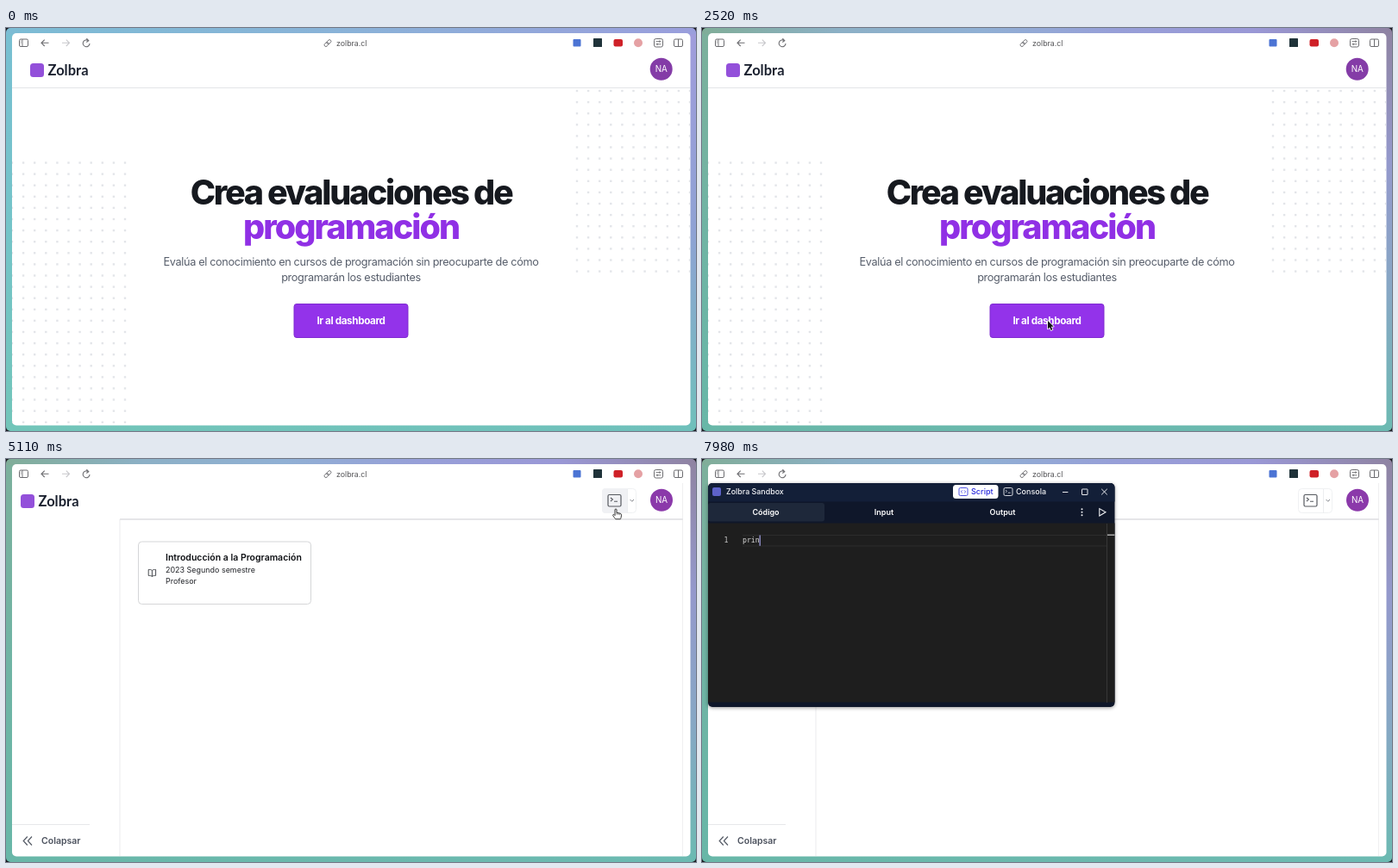
These frames come from a looping animation (800x468 px, 8000 ms). An HTML page with a canvas:

```html
<!DOCTYPE html>
<html lang="es">
<head>
<meta charset="utf-8">
<title>Zolbra</title>
<style>
  html, body { margin: 0; width: 100%; height: 100%; overflow: hidden; }
  canvas { display: block; width: 800px; height: 468px; }
</style>
</head>
<body>
<canvas id="stage" width="800" height="468"></canvas>
<script>
const ctx = document.getElementById('stage').getContext('2d');
const LOOP = 8000;
const BRAND = 'Zolbra';
const SANS = 'Inter, sans-serif';
const MONO = '"DejaVu Sans Mono", monospace';
const PURPLE = '#9333ea';
const NAVY = '#0f172a';

// Moments of the story, in ms
const AT = { enter: 560, hover: 2600, status: 2900, dash: 4200, menu: 4850,
             sandbox: 5320, ready: 6300, editor: 6950, type: 7430 };

// Pointer track: time, x, y
const TRACK = [
  [560, 446, 468], [1050, 427, 365], [1300, 427, 365], [2000, 401, 340],
  [4250, 401, 340], [4900, 707, 58], [6400, 707, 58], [7000, 225, 130]
];

const clamp = v => Math.max(0, Math.min(1, v));
const ease = v => v * v * (3 - 2 * v);

function rect(x, y, w, h, fill) {
  ctx.fillStyle = fill;
  ctx.fillRect(x, y, w, h);
}

function box(x, y, w, h, r, fill, stroke, lw = 1) {
  ctx.beginPath();
  ctx.roundRect(x, y, w, h, r);
  if (fill) { ctx.fillStyle = fill; ctx.fill(); }
  if (stroke) { ctx.strokeStyle = stroke; ctx.lineWidth = lw; ctx.stroke(); }
}

function disc(x, y, r, fill) {
  ctx.beginPath();
  ctx.arc(x, y, r, 0, 7);
  ctx.fillStyle = fill;
  ctx.fill();
}

function arc(x, y, r, from, to, color, lw) {
  ctx.beginPath();
  ctx.arc(x, y, r, from, to);
  ctx.strokeStyle = color;
  ctx.lineWidth = lw;
  ctx.stroke();
}

function line(d, color, lw = 1) {
  ctx.strokeStyle = color;
  ctx.lineWidth = lw;
  ctx.stroke(new Path2D(d));
}

function text(s, x, y, size, color, { weight = 400, align = 'left', gap = 0, family = SANS } = {}) {
  ctx.font = `${weight} ${size}px ${family}`;
  ctx.letterSpacing = gap + 'px';
  ctx.textAlign = align;
  ctx.fillStyle = color;
  ctx.fillText(s, x, y);
  ctx.letterSpacing = '0px';
}

function gradient(x0, y0, x1, y1, colors) {
  const g = ctx.createLinearGradient(x0, y0, x1, y1);
  colors.forEach((c, i) => g.addColorStop(i / (colors.length - 1), c));
  return g;
}

function desktop(t) {
  const late = t >= 1750;
  rect(0, 0, 800, 468, '#17171c');
  const top = late ? ['#80ad98', '#8cb0c6', '#90b0d4', '#979fd8', '#9a98d6', '#8f83a2']
                   : ['#7cbcd4', '#8ab2d8', '#9a9edc'];
  const side = late ? ['#7cb09c', '#70b4a4', '#68b7a8'] : ['#78bfd2', '#74c4c8', '#72c5b9'];
  const right = late ? ['#8f83a2', '#9499cc', '#86a8c4', '#6cbab2'] : ['#a09cdc', '#8fa2d4', '#6fc0bb'];
  ctx.save();
  ctx.beginPath();
  ctx.roundRect(0, 0, 800, 468, 5);
  ctx.clip();
  rect(0, 0, 800, 12, gradient(0, 0, 800, 0, top));
  rect(0, 456, 800, 12, gradient(0, 0, 800, 0, [side.at(-1), right.at(-1)]));
  rect(0, 7, 12, 454, gradient(0, 0, 0, 468, side));
  rect(788, 7, 12, 454, gradient(0, 0, 0, 468, right));
  ctx.restore();
  box(7, 6, 786.5, 455.5, 5, '#fff');
}

function toolbar() {
  const ink = '#6c6c70';
  box(15.5, 13, 10, 8.5, 1.5, null, ink);
  line('M19 13v8.5M16.8 15h1M16.8 17h1', ink, .9);
  line('M49.5 17.3H41M44.7 13.6L41 17.3l3.7 3.7', ink, 1.1);
  line('M65 17.3h8.5M69.8 13.6l3.7 3.7-3.7 3.7', '#c8c8cb', 1.1);
  line('M95.6 14.8A3.9 3.9 0 1 0 97 18M93.4 12.2l2.4 2.5-2.5 1.8', ink, 1.1);

  ctx.save();
  ctx.translate(373, 17.6);
  ctx.rotate(-Math.PI / 4);
  box(-4.8, -1.8, 5.6, 3.6, 1.8, null, ink, .9);
  box(-.8, -1.8, 5.6, 3.6, 1.8, null, ink, .9);
  ctx.restore();
  text('zolbra.cl', 383, 20.5, 8.8, '#555558');

  box(657.5, 13, 9, 8.5, 1, '#4c74d4');
  box(681, 12, 10, 10, .5, '#20333a');
  box(704.5, 13, 10.5, 8.5, 2, '#cf2128');
  disc(733, 17.3, 5, '#e5a1a4');
  box(751.5, 12.5, 10, 9.5, 2, null, ink);
  line('M753.5 15.6h6M753.5 18.8h6M757.8 14.4v2.4M755.2 17.6v2.4', ink, .9);
  box(774.5, 13, 10, 8.5, 1.5, null, ink);
  line('M779.5 13v8.5', ink);
}

function header(x) {
  box(x, 41, 16, 16, 3.5, '#9350da');
  text(BRAND, x + 20.5, 55, 16.5, '#1c2230', { weight: 700, family: 'Lato, sans-serif' });
}

function avatar(x, color) {
  disc(x, 47.8, 13, color);
  text('NA', x, 51.3, 9.8, '#fff', { align: 'center' });
}

function dots(x0, y0, cols, rows) {
  for (let i = 0; i < cols; i++)
    for (let j = 0; j < rows; j++)
      rect(x0 + i * 13.1 - 1.2, y0 + j * 13.1 - 1.2, 2.4, 2.4, '#e3e5e9');
}

function landing(t) {
  ctx.save();
  ctx.beginPath();
  ctx.rect(7, 28, 786, 433);
  ctx.clip();
  dots(7, 156.5, 11, 24);
  dots(662, 73, 11, 17);
  ctx.restore();
  header(28);
  avatar(759.7, '#843ca7');
  rect(7, 69, 786, 1, '#e3e5e8');

  const big = { weight: 800, align: 'center' };
  text('Crea evaluaciones de', 400, 205, 39.5, '#16191f', { ...big, gap: -2.3 });
  text('programación', 400, 244.5, 39.5, '#9030e5', { ...big, gap: -1.95 });
  const body = { align: 'center', gap: -.35 };
  text('Evalúa el conocimiento en cursos de programación sin preocuparte de cómo', 400, 276, 12.7, '#575e6b', body);
  text('programarán los estudiantes', 400, 294, 12.7, '#575e6b', body);

  const hover = t >= AT.hover;
  box(334, 320.5, 132, 39, 3, hover ? '#7e22ce' : PURPLE, hover ? '#6f1fbb' : '#7f2bd0');
  text('Ir al dashboard', 400, 344, 11.7, '#fff', { weight: 700, align: 'center', gap: -.37 });

  if (t >= AT.status) {
    box(13, 439.5, 82, 15.5, 7.75, '#828587', '#a4a6a8', .8);
    text('www.zolbra.cl/app', 54, 450.3, 8, '#f3f3f3', { align: 'center' });
  }
}

function dashboard(t) {
  header(17);
  rect(131.5, 70, 1, 391, '#ececee');
  rect(784, 28, 1, 433, '#f0f0f1');
  rect(132, 69, 653, 2, '#e6e6e8');

  const hover = t >= AT.menu && t < AT.ready + 150;
  box(691.5, 34.5, 39, 28, 4, '#fff', '#f0f1f3');
  if (hover) box(691, 34, 29.5, 29, [4, 0, 0, 4], '#f0f1f4');
  line('M720.5 35v28', '#eceef0');
  box(698, 41.5, 15, 13.5, 1.5, null, '#56595f', 1.2);
  line('M701 45l2.4 2-2.4 2M705 49.3h4', '#56595f', 1.1);
  line('M723.6 47l2.2 2.3 2.2-2.3', '#85888e', 1);
  avatar(760, '#8b39aa');

  box(153.5, 96, 200, 72.5, 4, '#fff', '#d5d6d8');
  line('M169.4 129.4c-1.2-1-2.8-1-4.2-1v7c1.6 0 3 .1 4.2 1 1.2-.9 2.6-1 4.2-1v-7c-1.4 0-3 0-4.2 1zv7', '#33363b', .9);
  text('Introducción a la Programación', 185, 118.3, 10.5, '#0d0f13', { weight: 600 });
  text('2023 Segundo semestre', 185, 132, 8.95, '#222429');
  text('Profesor', 185, 145, 8.95, '#222429');

  rect(7, 424, 90, 1, '#e7e8ea');
  line('M24.8 438.5l-4.6 5 4.6 5M30 438.5l-4.6 5 4.6 5', '#555b66', 1.2);
  text('Colapsar', 41, 447.2, 10.5, '#4b515d', { weight: 600 });
}

function sandboxFrame(loading) {
  ctx.save();
  ctx.shadowColor = 'rgba(0,0,0,.4)';
  ctx.shadowBlur = 4;
  ctx.shadowOffsetY = 1;
  box(7, 28, 471.5, 260, 5, NAVY);
  ctx.restore();
  box(7, 28, 471.5, 21.5, [5, 5, 0, 0], '#131f38');
  box(12, 33, 10, 10, 2, '#5d62c9');
  text(BRAND + ' Sandbox', 28, 41.3, 8.9, '#f3f4f6', { weight: 500 });

  box(291, 30, 52.5, 16, 3.5, '#fff');
  box(298, 33.5, 10, 9, 1.5, null, '#3d3fe0', .9);
  line('M302 36.3l-1.7 1.7 1.7 1.7M304 36.3l1.7 1.7-1.7 1.7', '#3d3fe0', .8);
  text('Script', 312, 41.3, 9.1, '#2a2bdc', { weight: 500 });
  box(350, 33.5, 10, 9, 1.5, null, '#e8eaee', .9);
  line('M352 36l1.5 1.4-1.5 1.4M354.8 39.2h2.8', '#e8eaee', .8);
  text('Consola', 364, 41.3, 9, '#f3f4f6', { weight: 500 });
  line('M418 38.5h6.4', '#e8eaee');
  box(440.5, 35, 6.5, 6.5, .3, null, '#e8eaee');
  line('M463.2 34.8l6.6 6.6M469.8 34.8l-6.6 6.6', '#e8eaee');

  box(7, 51, 135, 21.5, 3, '#1e283a');
  [['Código', 74], ['Input', 211], ['Output', 348.5]].forEach(([s, x]) =>
    text(s, x, 65.2, 9, '#fff', { weight: 600, align: 'center' }));
  [58.3, 61.8, 65.3].forEach(y => disc(440.5, y, 1, '#f0f1f4'));
  rect(7, 74.5, 471.5, loading ? 203 : 208, '#1e1e1e');
}

function spinner(t) {
  const mid = 1.94 + (t - 5670) / 1400 * Math.PI * 2;
  arc(464, 61.7, 5.6, 0, 7, '#c9ccd2', 1.4);
  arc(464, 61.7, 5.6, mid - .6, mid + .6, '#5a6270', 1.4);
  arc(242.5, 189.5, 28.3, 0, 7, '#e9e9ea', 5.6);
  ctx.lineCap = 'round';
  arc(242.5, 189.5, 28.3, mid - .61, mid + .61, PURPLE, 5.6);
  ctx.lineCap = 'butt';
}

function editor(t) {
  line('M460.8 57.6v8.4l7.2-4.2z', '#f0f1f4', 1.1);
  rect(469, 75, 1, 208, '#373737');
  rect(47, 88, 422, 1, '#2c2c2c');
  rect(47, 100.5, 422, 1, '#2c2c2c');
  rect(470, 87.5, 8.5, 1.5, '#a9a9a9');
  const mono = { family: MONO };
  text('1', 25.5, 97.2, 8.2, '#c6c6c6', mono);
  const count = t < AT.type ? 0 : Math.min(4, 1 + Math.floor((t - AT.type) / 145));
  text('print'.slice(0, count), 47, 97.2, 8.2, '#dcdcdc', mono);
  if (t >= AT.editor) rect(46.8 + count * 4.94, 88.5, 1.2, 12.3, '#a3a1e6');
}

function pointerAt(t) {
  const next = TRACK.findIndex(k => k[0] > t);
  if (next < 0) return TRACK[TRACK.length - 1].slice(1);
  const [t0, x0, y0] = TRACK[next - 1], [t1, x1, y1] = TRACK[next];
  const p = ease(clamp((t - t0) / (t1 - t0)));
  return [x0 + (x1 - x0) * p, y0 + (y1 - y0) * p];
}

const ARROW = new Path2D('M0 0v9.4l2.1-2 1.6 3.6 1.7-.7-1.6-3.5h2.9z');
const HAND = new Path2D('M-1 1c0-1.4 2-1.4 2 0v3.3l4 .9c1.2.3 1.7.9 1.6 2L6 10.2c-.2 1-.6 1.6-.6 1.6H-.3S-2 9.6-3.2 7.8c-.6-1 .5-1.9 1.3-1.1l.9.9z');

function pointer(t) {
  if (t < AT.enter || t >= AT.type) return;
  const [x, y] = pointerAt(t);
  const onButton = t >= AT.hover && t < 4350;
  const onMenu = t >= AT.menu && t < AT.ready + 150;
  ctx.save();
  ctx.translate(x, y);
  ctx.lineJoin = 'round';
  if (onButton || onMenu) {
    if (onButton) ctx.translate(0, -3);
    ctx.fillStyle = '#fff';
    ctx.fill(HAND);
    ctx.strokeStyle = '#222';
    ctx.lineWidth = .9;
    ctx.stroke(HAND);
    line('M1 4.3v2.4M2.9 4.8v2.2M4.8 5.3v2', '#333', .6);
  } else if (t >= AT.editor) {
    line('M-2 -5q2 0 2 1.4v7.2q0 1.4-2 1.4M2 -5q-2 0-2 1.4v7.2q0 1.4 2 1.4', '#ddd', .9);
  } else {
    ctx.strokeStyle = '#fff';
    ctx.lineWidth = 1.6;
    ctx.stroke(ARROW);
    ctx.fillStyle = '#111';
    ctx.fill(ARROW);
  }
  ctx.restore();
}

function draw(t) {
  desktop(t);
  toolbar();
  if (t < AT.dash) {
    landing(t);
  } else {
    dashboard(t);
    if (t >= AT.sandbox) {
      const loading = t < AT.ready;
      sandboxFrame(loading);
      if (loading) spinner(t); else editor(t);
    }
  }
  pointer(t);
}

const start = performance.now();
function tick() {
  draw((performance.now() - start) % LOOP);
  requestAnimationFrame(tick);
}
tick();
</script>
</body>
</html>
```
